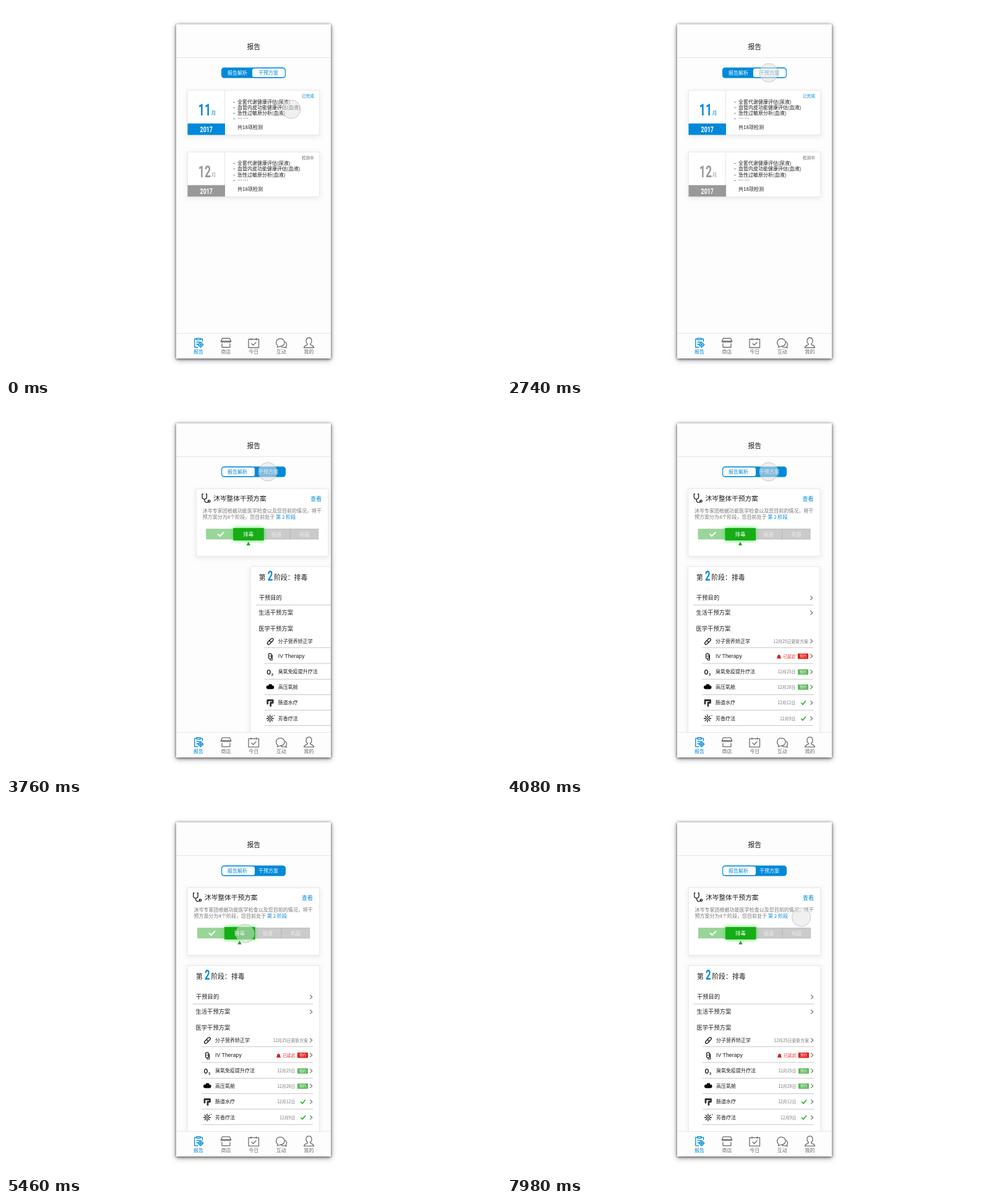
An HTML page for the animation above (8000 ms loop, 800 px wide and 600 px high).

```html
<!DOCTYPE html>
<html lang="zh-CN">
<head>
<meta charset="utf-8">
<style>
html, body { margin: 0; width: 100%; height: 100%; overflow: hidden; background: #fff; }
svg { display: block; width: 800px; height: 600px; font-family: "Noto Sans CJK SC", "Noto Sans CJK", "Noto Sans CJK JP", sans-serif; }
.num { font-family: Roboto, Arial, sans-serif; font-weight: 700; }
.latin { font-family: "Liberation Sans", Arial, sans-serif; }
.phone { filter: drop-shadow(0 1px 2px rgba(0,0,0,.6)) drop-shadow(0 2px 4px rgba(0,0,0,.35)); }
.card { fill: #fff; stroke: #e9e9e9; filter: drop-shadow(0 2px 4px rgba(0,0,0,.09)); }
.glow { filter: drop-shadow(0 0 3px #3be63b); }
.icon { fill: none; stroke-width: 1.3; stroke-linecap: round; stroke-linejoin: round; }
</style>
</head>
<body>
<svg id="stage" viewBox="0 0 800 600"></svg>
<script>
const BLUE = '#0089d8', INK = '#1c1c1c', GRAY = '#777', GREEN = '#16ad16';

const text = (x, y, size, str, fill = INK, anchor = 'start', more = '') =>
  `<text x="${x}" y="${y}" font-size="${size}" fill="${fill}" text-anchor="${anchor}" ${more}>${str}</text>`;
const rect = (x, y, w, h, more) => `<rect x="${x}" y="${y}" width="${w}" height="${h}" ${more}/>`;
const line = (x1, y, x2, color) => `<path d="M${x1} ${y}H${x2}" stroke="${color}"/>`;
const icon = (d, color, more = '') => `<path class="icon" d="${d}" stroke="${color}" ${more}/>`;
// Narrow numerals
const num = (x, y, size, str, fill) =>
  `<g transform="translate(${x} ${y}) scale(.68 1)">${text(0, 0, size, str, fill, 'middle', 'class="num"')}</g>`;
const chevron = y => icon(`M491.5 ${y - 3}l3.3 3l-3.3 3`, '#777', 'style="stroke-width:1.1"');

function monthCard(dy, month, color, status, statusColor) {
  const items = ['全套代谢健康评估(尿液)', '血管内皮功能健康评估(血液)', '急性过敏原分析(血液)', '… …'];
  return `<g transform="translate(0 ${dy})">` +
    rect(293.5, 136.5, 213, 72, 'class="card"') +
    `<path d="M353.5 137V208" stroke="#e6e6e6"/>` +
    rect(293.5, 190, 60.5, 18.5, `fill="${color}"`) +
    num(321, 177, 26, month, color) + text(331.5, 176, 8, '月', color) +
    num(323.7, 204, 13, '2017', '#fff') +
    items.map((s, i) => text(366.5, 157.5 + i * 9.3, 8, '–') + text(374, 157.5 + i * 9.3, 8, s)).join('') +
    text(374, 199.3, 8, '共18项检测') +
    text(498, 148, 6.7, status, statusColor, 'end') + '</g>';
}

function planCard() {
  const scope = 'M304 144h-1.2v4.5c0 5 7.4 5 7.4 0v-4.5h-1.2M306.6 152.5c0 7 6.6 6 6.6 2.5';
  return rect(293.5, 135.5, 213, 109, 'class="card"') +
    icon(scope, INK) + `<circle class="icon" cx="314" cy="155.6" r="1.8" stroke="${INK}"/>` +
    text(321, 155, 10.7, '沐岑整体干预方案') +
    text(496, 154.5, 9, '查看', BLUE, 'end') +
    text(303.5, 174.3, 8.03, '沐岑专家团根据功能医学检查以及您目前的情况，将干', GRAY) +
    text(303.5, 184, 8.03, '预方案分为4个阶段，您目前处于', GRAY) +
    text(422, 184, 8.03, '第 2 阶段', BLUE) +
    rect(309.5, 200.5, 44, 16.5, 'fill="#98d698" stroke="#8fc98f" stroke-width=".6"') +
    rect(402, 200.5, 43, 16.5, 'fill="#cbcbcb" stroke="#b4b4b4" stroke-width=".8"') +
    rect(445, 200.5, 45.5, 16.5, 'fill="#cbcbcb" stroke="#b4b4b4" stroke-width=".8"') +
    rect(353, 199, 49.5, 20, `class="glow" fill="${GREEN}"`) +
    icon('M328.5 209l3 3l6-6', '#fff', 'style="stroke-width:1.8"') +
    text(377.5, 212, 8.5, '排毒', '#fff', 'middle', 'font-weight="500"') +
    text(423, 212, 8, '促进', '#f0f0f0', 'middle') + text(468, 212, 8, '巩固', '#f0f0f0', 'middle') +
    `<path d="M374.3 227l3.2-6l3.2 6z" fill="${GREEN}"/>`;
}

const rowIcons = [
  icon('M321.5 383.5l5-5.2c2.5-2.2 5.2.6 3 3l-5 5.2c-2.5 2.2-5.2-.6-3-3zM324 381l3 3', INK),
  icon('M322.5 402.5h5v6.5q-2.5 2.5-5 0zM325 401v1.5M325 410.5v2h3.5v-8M323 406h4', INK, 'style="stroke-width:1.1"'),
  text(319.5, 435.5, 10, 'O', INK, 'start', 'class="num"') + text(327, 437.5, 5.5, '3', INK, 'start', 'class="num"'),
  `<rect x="319" y="453.5" width="12.5" height="6" rx="3"/><path d="M323 451.5h5v3h-5z"/>`,
  icon('M321 483v-5.5h8.5v4h-3.5v5', '#333', 'style="stroke-width:2.8"'),
  [...Array(8)].map((_, i) => `<path class="icon" transform="rotate(${i * 45} 325 507)" d="M325 504.5v-3" stroke="${INK}"/>`).join('') +
    `<circle cx="325" cy="507" r="1"/><circle cx="331.8" cy="502.3" r="1" fill="#777"/>`
];

function stageCard() {
  const rows = [
    [382, '分子营养矫正学', '12月25日更新方案', 'note'],
    [406, 'IV Therapy', '已延迟', 'late'],
    [431.5, '臭氧免疫提升疗法', '12月25日', 'book'],
    [456, '高压氧舱', '12月28日', 'book'],
    [481.5, '肠道水疗', '12月12日', 'done'],
    [507, '芳香疗法', '12月9日', 'done']
  ];
  const button = (y, color) => rect(471, y - 4.3, 17, 8.6, `fill="${color}"`) +
    text(479.5, y + 2, 5.6, '预约', '#fff', 'middle');
  const row = ([y, name, info, kind], i) => {
    const late = kind == 'late';
    let s = rowIcons[i] + text(338, y + 2.8, late ? 8.8 : 8, name, INK, 'start', late ? 'class="latin"' : '') +
      text(kind == 'note' ? 488 : 467.3, y + 2.6, late ? 6.7 : 6.9, info, late ? '#e02020' : GRAY, 'end') +
      chevron(y) + line(316, [392.5, 418, 443.5, 468.5, 493.5, 518.5][i], 496, '#c9c9c9');
    if (late) s += `<path d="M437 410v-1.2h1v-3q2.5-4 5 0v3h1v1.2z" fill="#e02020"/>`;
    if (late || kind == 'book') s += button(y + .3, late ? '#e21a12' : '#5cb85c');
    if (kind == 'done') s += icon(`M476.8 ${y + .5}l2.2 2.4l4.5-5.6`, '#2fb52f', 'style="stroke-width:1.7"');
    return s;
  };
  return rect(293.5, 261.5, 213, 300, 'class="card"') +
    text(307, 282.5, 10.8, '第') + num(325.2, 284, 22, '2', BLUE) + text(331.5, 282.5, 10.8, '阶段：排毒') +
    text(307, 315, 9.3, '干预目的') + chevron(312) + line(302, 323.5, 496, '#c9c9c9') +
    text(306.5, 339, 9.3, '生活干预方案') + chevron(336) +
    text(306.5, 365.3, 9.3, '医学干预方案') + rows.map(row).join('');
}

function tabs() {
  const g = '#6d6d6d';
  return icon('M310 552h-5.2v-13.5h2.2M315 538.5h2.5v4M308 537.3h6v2.6h-6zM308 543.5h5M308 547h2', BLUE) +
    icon('M314.5 543.5l4.3 4.3l-4.3 4.3l-4.3-4.3zM314.5 545.8v4M312.5 547.8h4', BLUE) +
    icon('M349.5 537.5h12l2.3 5q-2 3-4.2 0q-2 3-4.1 0q-2 3-4.1 0q-2.2 3-4.2 0zM347.5 542h16M349 546.5v5.5h13v-5.5', g) +
    icon('M392 539h16.5v13.5h-16.5zM396 537.5v2.5M404.5 537.5v2.5M397 546l2.5 2.5l4.5-4.5', g) +
    icon('M438.5 552l.6-2.4c-5-4.5-1.6-11.6 4.3-11.6c8.4 0 9.4 12 .2 12.3zM451.3 543.2c3 2.2 2.8 5.4 1 7.2l.8 2.6l-3-1.2q-2.5.8-5-.3', g) +
    icon('M489.5 536.5c-6 0-5.2 8.2-2 10.2c0 2.4-5.7 1.6-6 5.8h16c-.3-4.2-6-3.4-6-5.8c3.2-2 4-10.2-2-10.2z', g) +
    ['报告', '商店', '今日', '互动', '我的'].map((s, i) =>
      text(311 + i * 44.6, 562.3, 8, s, i ? g : BLUE, 'middle')).join('');
}

document.getElementById('stage').innerHTML =
  `<clipPath id="view"><rect x="275" y="84" width="250" height="445"/></clipPath>` +
  rect(275, 29.5, 250, 540.5, 'class="phone" fill="#fdfdfd"') +
  text(400.3, 69.5, 10.8, '报告', INK, 'middle') + line(275, 83.5, 525, '#e6e6e6') +
  rect(348, 99.5, 104, 17, `rx="4.5" fill="${BLUE}"`) +
  `<rect id="knob" y="100.3" width="54" height="15.4" rx="4" fill="#fff" stroke="${BLUE}" stroke-width="1.2"/>` +
  text(374, 111, 8, '报告解析', '#fff', 'middle', 'id="tabA"') +
  text(424, 111, 8, '干预方案', BLUE, 'middle', 'id="tabB"') +
  '<g clip-path="url(#view)"><g id="months">' +
  monthCard(0, '11', BLUE, '已完成', BLUE) + monthCard(99.7, '12', '#999', '检测中', '#666') +
  `</g><g id="plan">${planCard()}</g><g id="detail">${stageCard()}</g></g>` +
  line(275, 529.5, 525, '#e8e8e8') + `<g id="tabs">${tabs()}</g>` +
  '<circle id="touch" r="15" fill="rgba(228,228,228,.55)" stroke="rgba(180,180,180,.7)"/>';

const el = Object.fromEntries(['knob', 'tabA', 'tabB', 'months', 'plan', 'detail', 'tabs', 'touch']
  .map(id => [id, document.getElementById(id)]));
const ramp = (t, a, b) => Math.min(1, Math.max(0, (t - a) / (b - a)));
const smooth = p => p * p * (3 - 2 * p);
const quint = p => p < .5 ? 16 * p ** 5 : 1 - 16 * (1 - p) ** 5;
const move = (node, x, y) => node.setAttribute('transform', `translate(${x} ${y})`);
const mix = (a, b, p) => `rgb(${a.map((v, i) => Math.round(v + (b[i] - v) * p))})`;

// Each leg: start, end, then from, control and to points
const legs = [
  [860, 2100, [461, 167], [477, 98], [423, 108]],
  [4500, 5500, [423, 108], [404, 159], [386, 210]],
  [7460, 8000, [386, 210], [431, 197], [476, 183]]
];

function touchAt(t) {
  const [a, b, from, ctl, to] = legs.filter(l => t >= l[0]).pop() || legs[0];
  const u = smooth(ramp(t, a, b)), v = 1 - u;
  return [0, 1].map(i => v * v * from[i] + 2 * u * v * ctl[i] + u * u * to[i]);
}

function slide(t, start, over) {
  return 240 - (240 + over) * quint(ramp(t, start, start + 700)) + over * smooth(ramp(t, 4650, 4900));
}

function draw() {
  const t = performance.now() % 8000;
  const swap = smooth(ramp(t, 2950, 3250)), white = [255, 255, 255], blue = [0, 137, 216];
  el.knob.setAttribute('x', 397.4 - 48.8 * swap);
  el.tabA.setAttribute('fill', mix(white, blue, swap));
  el.tabB.setAttribute('fill', mix(blue, white, swap));
  el.months.setAttribute('opacity', 1 - swap);
  move(el.plan, slide(t, 3291, .5), 0);
  move(el.detail, slide(t, 3400, 1), 0);
  move(el.tabs, 0, .7 * swap);
  move(el.touch, ...touchAt(t));
  requestAnimationFrame(draw);
}
draw();
</script>
</body>
</html>
```
